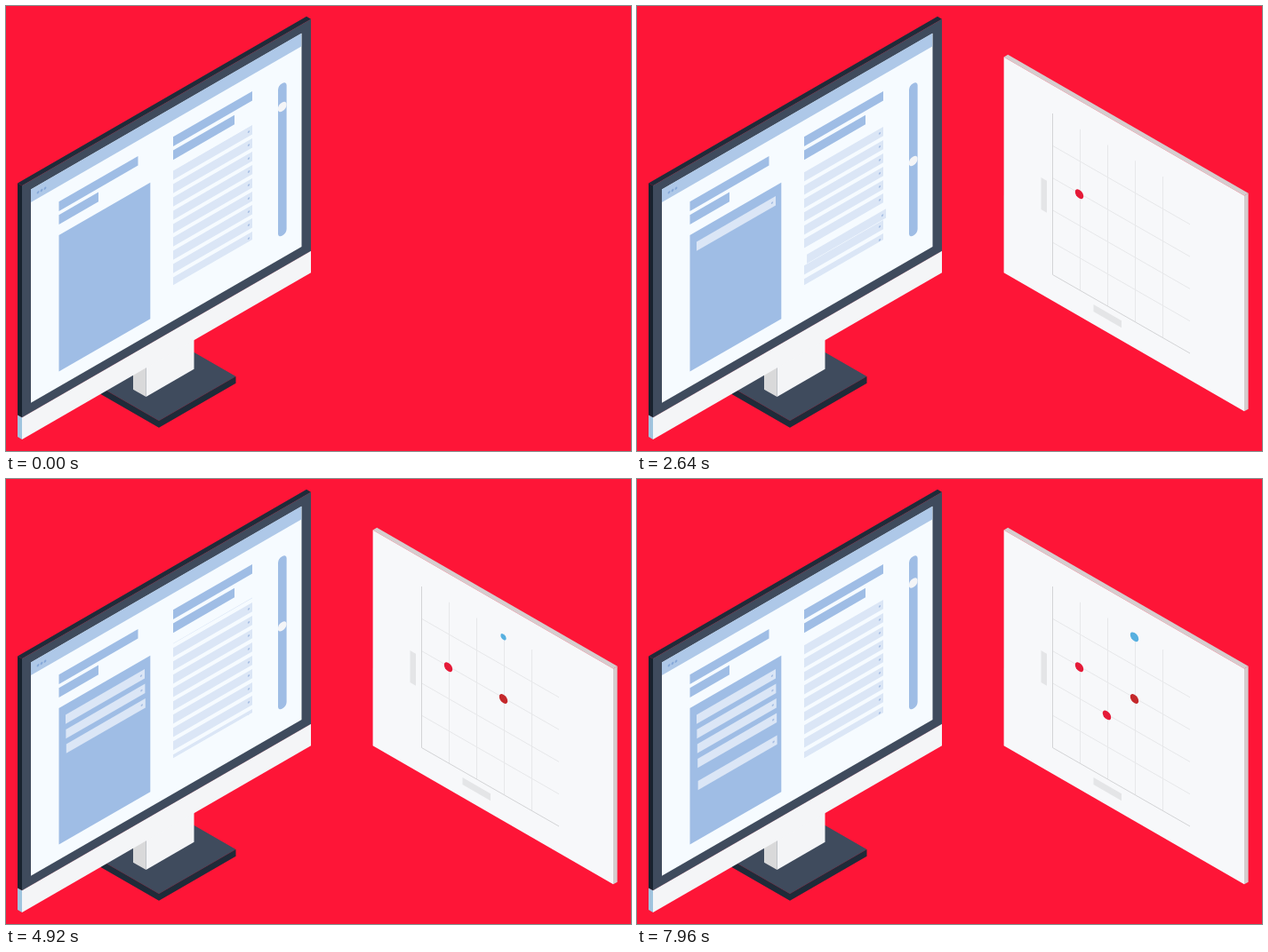
These frames come from a looping animation (703x501 px, 8 s). An HTML page with a canvas:

```html
<!DOCTYPE html>
<html lang="en">
<head>
<meta charset="utf-8">
<title>List to chart</title>
<style>
  html, body { margin: 0; width: 100%; height: 100%; overflow: hidden; background: #fe1537; }
  canvas { display: block; width: 703px; height: 501px; }
</style>
</head>
<body>
<canvas id="stage" width="703" height="501"></canvas>
<script>
const ctx = document.getElementById('stage').getContext('2d');
const LOOP = 8000;
const ISO = 0.5774;
const RED = '#fe1537', BLUE = '#9fbde5', PALE = '#dbe6f6', DARK = '#3f4b5d', EDGE = '#1f2b39', WHITE = '#f4f5f7';
const LIST = { x: 188, y: 185.5, w: 89, h: 128.8, row: 15, bar: 10.3 };
const SLOT = { x: 67, y: 265.5, row: 16.5 };
const GRID = { x: 467.5, y: 121, w: 154.5, h: 181.5, col: 31, row: 36.3 };

// each item leaves its list row for the next free slot
const MOVES = [
  { start: 0, row: 3 },
  { start: 2360, row: 6 },
  { start: 3800, row: 1 },
  { start: 5480, row: 6 },
  { start: 7200, row: 7 }
];
const DOTS = [
  { col: 1, row: 2, start: 1420, color: '#e51a38' },
  { col: 3, row: 2, start: 3340, color: '#c4282b' },
  { col: 3, row: 0.08, start: 4800, color: '#57b0e0' },
  { col: 2, row: 3, start: 6480, color: '#e51a38' }
];

const span = (t, a, b) => Math.max(0, Math.min(1, (t - a) / (b - a)));
const mix = (a, b, p) => a + (b - a) * p;
const easeOut = p => 1 - (1 - p) * (1 - p);
const easeInOut = p => p < 0.5 ? 4 * p ** 3 : 1 - 4 * (1 - p) ** 3;

const scrollDown = t => easeInOut(span(t, 1420, 2000));
const scrollUp = t => easeInOut(span(t, 4660, 5440));
const listShift = t => 1.8 * scrollDown(t) - 8 * LIST.row * (scrollDown(t) - scrollUp(t));
const handleY = t => 113.5 + 61 * scrollDown(t) - 57.5 * scrollUp(t);

function poly(color, ...pts) {
  ctx.fillStyle = color;
  ctx.beginPath();
  for (let i = 0; i < pts.length; i += 2) ctx.lineTo(pts[i], pts[i + 1]);
  ctx.closePath();
  ctx.fill();
}

function line(color, x, y, dx, dy) {
  ctx.strokeStyle = color;
  ctx.beginPath();
  ctx.moveTo(x, y);
  ctx.lineTo(x + dx, y + dy);
  ctx.stroke();
}

// upright rectangle on an isometric plane, rising to the right by default
function bar(color, x, y, w, h, slope = -ISO) {
  const d = w * slope;
  poly(color, x, y, x + w, y + d, x + w, y + d + h, x, y + h);
}

// solid with a front, one side face and a top; depth is the sideways run of the side
function block(x, y, w, h, depth, front, side, top, slope = -ISO) {
  const d = w * slope, back = -depth * slope;
  const end = depth < 0 ? 0 : w;
  poly(top, x, y, x + w, y + d, x + w + depth, y + d + back, x + depth, y + back);
  bar(side, x + end, y + end * slope, depth, h, -slope);
  bar(front, x, y, w, h, slope);
}

function skewed(color, x, y, slope, shape) {
  ctx.save();
  ctx.transform(1, slope, 0, 1, x, y);
  ctx.fillStyle = color;
  ctx.beginPath();
  shape();
  ctx.fill();
  ctx.restore();
}

const disc = (color, x, y, r, slope = -ISO) =>
  skewed(color, x, y, slope, () => ctx.arc(0, 0, r, 0, Math.PI * 2));

function item(x, y) {
  bar(PALE, x, y, LIST.w, LIST.bar);
  disc('#a9c0e4', x + 85, y + 5.2 - 85 * ISO, 1.2);
}

function drawMonitor() {
  block(172, 467, 86.5, 7.7, -72, EDGE, EDGE, DARK);
  block(157.5, 400, 54, 40, -14.5, WHITE, '#d9d9da', WHITE);
  block(18, 463.3, 325, 24.6, -5, WHITE, '#9fc4de', WHITE);
  block(18, 202.3, 325, 261, -5, DARK, '#18222e', EDGE);
  // page
  bar('#f6fbff', 28, 206.5, 304.5, 240.3);
  bar('#aec8e8', 28, 206.5, 304.2, 14.6);
  for (let i = 0; i < 3; i++) disc('#86a8d8', 36 + i * 4, 209.8 - i * 4 * ISO, 1.4);
  bar(BLUE, 59.5, 220.3, LIST.w, 10.6);
  bar(BLUE, 59.5, 235.3, LIST.w / 2, 10.6);
  bar(BLUE, 59.5, 258, 102.8, 153.5);
  bar(BLUE, LIST.x, 147.3, LIST.w, 10.6);
  bar(BLUE, LIST.x, 162.6, 69, 10.6);
}

function drawSlider(t) {
  skewed(BLUE, 310.8, 0, -ISO, () => ctx.roundRect(-4.8, 87, 9.6, 171.5, 4.8));
  disc(WHITE, 310.7, handleY(t), 4.9);
}

function drawList(t) {
  const shift = listShift(t);
  const first = Math.floor(-shift / LIST.row);
  const gap = MOVES.find(m => t > m.start && t < m.start + 660);
  ctx.save();
  ctx.beginPath();
  skewedClip();
  for (let i = 0; i < 12; i++) {
    let y = LIST.y + (first + i) * LIST.row + shift;
    // rows below a taken item wait, then close up
    if (gap && y > LIST.y + (gap.row - 0.1) * LIST.row) {
      y += LIST.row * (1 - easeInOut(span(t, gap.start + 300, gap.start + 660)));
    }
    item(LIST.x, y);
  }
  ctx.restore();
}

function skewedClip() {
  const { x, y, w, h } = LIST, d = w * ISO;
  ctx.moveTo(x, y - 0.5);
  ctx.lineTo(x + w, y - 0.5 - d);
  ctx.lineTo(x + w, y + h - d);
  ctx.lineTo(x, y + h);
  ctx.clip();
}

function drawMoves(t) {
  MOVES.forEach((m, i) => {
    const dt = t - m.start;
    if (dt <= 0) return;
    const endX = SLOT.x + i * 0.4;
    const endLevel = SLOT.y + i * SLOT.row + (endX - LIST.x) * ISO;
    const startLevel = LIST.y + m.row * LIST.row + 1.8 * scrollDown(m.start);
    // pull to the right, sweep left along the row, then rise or drop into the slot
    const pulled = LIST.x + 8 * easeOut(span(dt, 0, 130));
    const x = mix(pulled, endX, span(dt, 140, 660) ** 2.5);
    const lifted = startLevel + 14 * span(dt, 0, 600) ** 1.6;
    const level = mix(lifted, endLevel, easeOut(span(dt, 660, 840)));
    item(x, level - (x - LIST.x) * ISO);
  });
}

function drawBoard(t) {
  const p = easeOut(span(t, 840, 1200));
  if (!p) return;
  const { x, y, w, h, col, row } = GRID;
  const drop = w * 0.573;
  ctx.save();
  ctx.globalAlpha = p;
  ctx.translate(0, 4 * (1 - p));
  block(412.6, 57.4, 270.4, 242.8, 4.6, '#f7f8fa', '#d5cdce', '#d5cdce', ISO);
  for (let i = 1; i < 5; i++) {
    line('#e7e8ea', x + i * col, y + i * col * 0.573, 0, h);
    line('#e7e8ea', x, y + i * row, w, drop);
  }
  line('#d3d4d6', x, y, 0, h);
  line('#d3d4d6', x, y + h, w, drop);
  bar('#e4e5e7', 454.5, 193, 6.5, 36, ISO);
  bar('#e4e5e7', 513.5, 336, 31.5, 8, ISO);
  ctx.restore();
  for (const dot of DOTS) {
    const grow = easeOut(span(t, dot.start, dot.start + 290));
    const run = dot.col * col - 1;
    if (grow) disc(dot.color, x + run, y + 0.8 + dot.row * row + run * ISO, 4.7 * grow, ISO);
  }
}

function draw(t) {
  ctx.fillStyle = RED;
  ctx.fillRect(0, 0, 703, 501);
  drawMonitor();
  drawSlider(t);
  drawList(t);
  drawMoves(t);
  drawBoard(t);
}

const begin = performance.now();
function frame() {
  draw((performance.now() - begin) % LOOP);
  requestAnimationFrame(frame);
}
draw(0);
requestAnimationFrame(frame);
</script>
</body>
</html>
```
